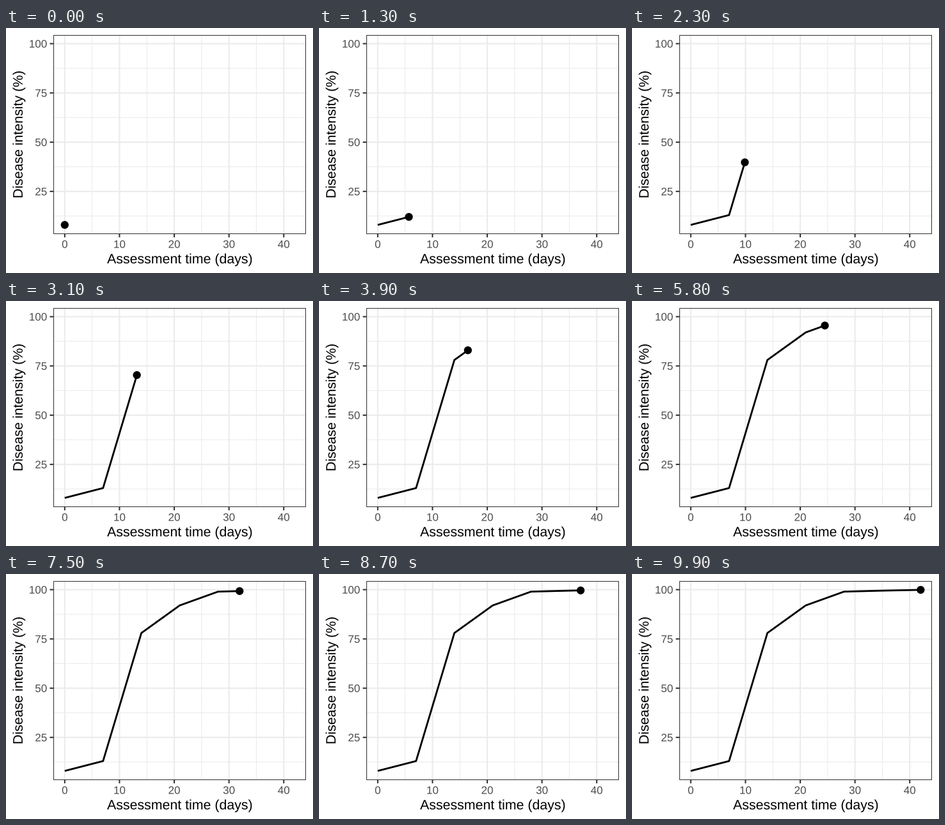
A matplotlib script that plays this animation: 480x384 px, repeating every 10 s.

```python
import numpy as np
import matplotlib.pyplot as plt
from matplotlib.animation import FuncAnimation
from matplotlib.patches import Circle, PathPatch, Rectangle
from matplotlib.textpath import TextPath
from matplotlib.transforms import Affine2D

W, H, DPI = 480, 384, 96
FRAMES, INTERVAL = 100, 100
LEFT, RIGHT, TOP, BOTTOM = 73.87, 469.33, 10.67, 322.8  # panel, px
TICK = 5.33
LABEL, TITLE = 17.07, 21.33  # font sizes, px
DIGIT = 0.556 * LABEL
THICK, THIN = 1.55, 0.78
GRID, DARK, GREY = "#ebebeb", "#333333", "#4d4d4d"

days = np.arange(0, 43, 7)
disease = np.array([8, 13, 78, 92, 99, 99.5, 99.9])
# each observation is reached on a whole frame
knots = np.round(np.linspace(0, FRAMES - 1, len(days)))


def scaler(values, start, end):
    """Map data to pixels with 5 % padding at both ends."""
    pad = 0.05 * np.ptp(values)
    lo, hi = values.min() - pad, values.max() + pad
    return lambda v: start + (v - lo) / (hi - lo) * (end - start)


px = scaler(days, LEFT, RIGHT)
py = scaler(disease, BOTTOM, TOP)

fig = plt.figure(figsize=(W / DPI, H / DPI), dpi=DPI, facecolor="white")
ax = fig.add_axes([0, 0, 1, 1])
ax.set(xlim=(0, W), ylim=(H, 0))
ax.axis("off")


def segment(xs, ys, color, width, z):
    ax.plot(xs, ys, color=color, lw=width, zorder=z, snap=False,
            solid_capstyle="butt")


def text(s, x, y, size, color, angle=0, centered=False):
    path = TextPath((0, 0), s, size=size, prop={"family": "Liberation Sans"})
    if centered:
        box = path.get_extents()
        path = Affine2D().translate(-(box.x0 + box.x1) / 2, 0).transform_path(path)
    place = Affine2D().scale(1, -1).rotate_deg(angle).translate(x, y)
    ax.add_patch(PathPatch(place.transform_path(path), fc=color, lw=0, zorder=5))


def vline(v, width):
    segment([px(v)] * 2, [TOP, BOTTOM], GRID, width, 1)


def hline(v, width):
    segment([LEFT, RIGHT], [py(v)] * 2, GRID, width, 1)


for v in range(5, 40, 10):
    vline(v, THIN)
for v in np.arange(12.5, 100, 25):
    hline(v, THIN)

for v in range(0, 50, 10):
    vline(v, THICK)
    segment([px(v)] * 2, [BOTTOM, BOTTOM + TICK], DARK, THICK, 2)
    s = str(v)
    text(s, px(v) - len(s) * DIGIT / 2, 344.7, LABEL, GREY)

for v in range(25, 101, 25):
    hline(v, THICK)
    segment([LEFT - TICK, LEFT], [py(v)] * 2, DARK, THICK, 2)
    s = str(v)
    text(s, 64.27 - len(s) * DIGIT, py(v) + 0.358 * LABEL, LABEL, GREY)

text("Assessment time (days)", 271.2, 368.9, TITLE, "black", centered=True)
text("Disease intensity (%)", 25.9, 166.7, TITLE, "black", -90, centered=True)

# only the inner half of the frame stroke is visible
border = Rectangle((LEFT, TOP), RIGHT - LEFT, BOTTOM - TOP, fill=False,
                   ec=DARK, lw=THICK, zorder=6)
ax.add_patch(border)
border.set_clip_path(Rectangle((LEFT, TOP), RIGHT - LEFT, BOTTOM - TOP,
                               transform=ax.transData))

curve, = ax.plot([], [], color="black", lw=2.13, zorder=3, snap=False,
                 solid_capstyle="butt", solid_joinstyle="round")
dot = Circle((px(0), py(8)), 6.16, fc="black", lw=0, zorder=4)
ax.add_patch(dot)


def update(i):
    day = np.interp(i, knots, days)
    level = np.interp(day, days, disease)
    past = days < day
    curve.set_data(px(np.append(days[past], day)),
                   py(np.append(disease[past], level)))
    dot.center = px(day), py(level)
    return curve, dot


anim = FuncAnimation(fig, update, frames=FRAMES, interval=INTERVAL,
                     repeat=True, repeat_delay=0)
plt.show()
```
